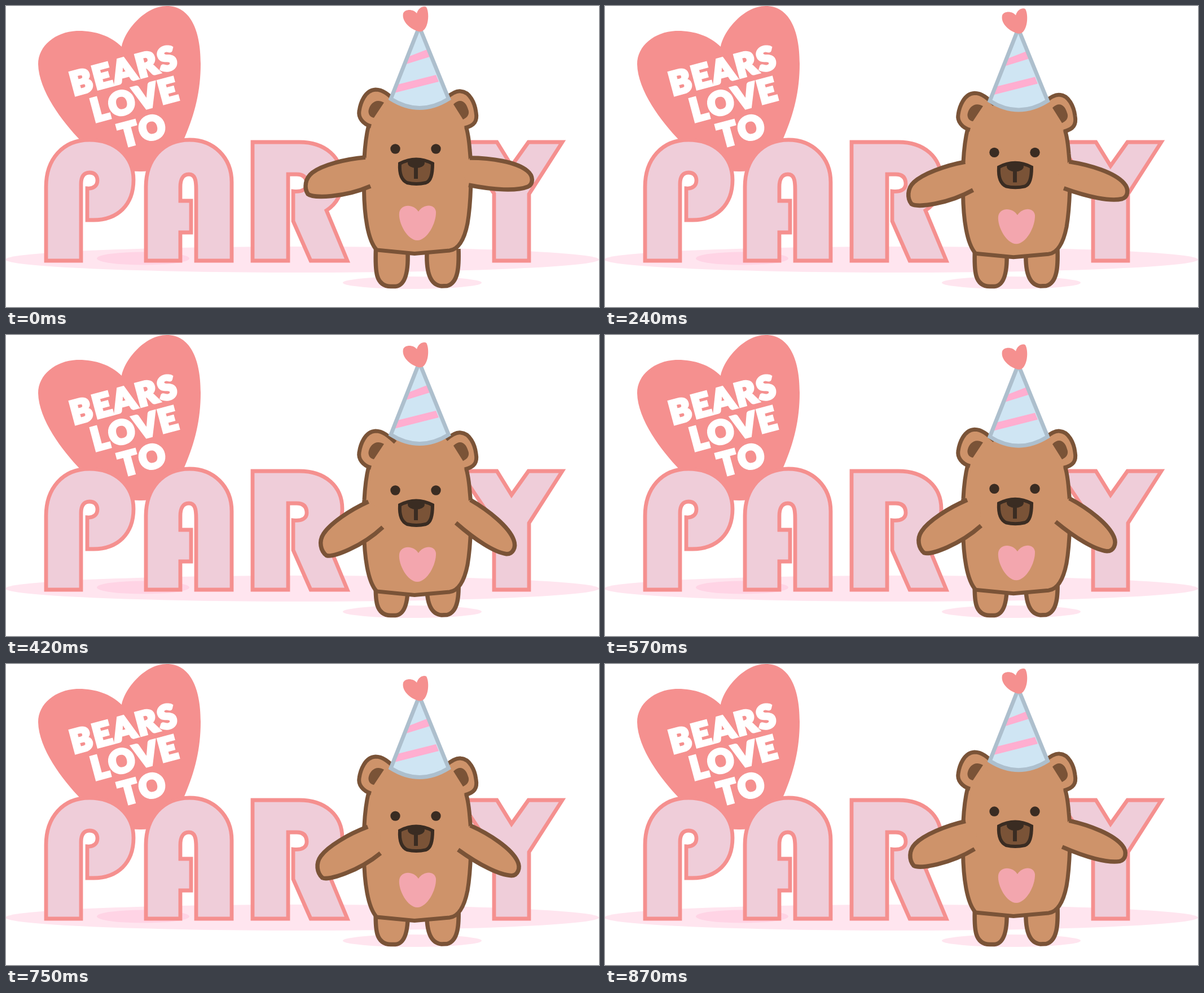
Animation of 1051x533 px, one loop 0.9 s. Source, as an HTML page with a canvas:

```html
<!DOCTYPE html>
<html lang="en">
<head>
<meta charset="utf-8">
<title>Bears love to party</title>
<style>
html, body { margin: 0; width: 100%; height: 100%; overflow: hidden; background: #fff; }
canvas { display: block; }
</style>
</head>
<body>
<canvas id="stage" width="1051" height="533"></canvas>
<script>
const ctx = document.getElementById('stage').getContext('2d');

const LOOP = 900, STEP = 30;
const CORAL = '#f5908f', ROSE = '#efcdd9', HAZE = '#ffe5ef';
const FUR = '#ce936a', BROWN = '#7a5337', DARK = '#3a2c22';

const P = d => new Path2D(d);

// An open outline whose fill is widened by an unstroked extra part.
const open = (d, extra) => ({ line: P(d), area: P(d + extra + 'Z') });

const bigHeart = P('M205 72C185 52 155 43 125 44C88 46 57 70 57 103C58 150 100 205 132 238C165 275 200 293 237 293C275 294 300 270 317 232C335 190 345 150 345 102C345 40 325 0 285 0C245 0 210 45 205 72Z');

const letters = [
  'M71 451V320C71 272 100 237 148 237C192 237 226 265 226 308C226 352 198 379 155 379H144V323C155 324 162 318 162 309C162 299 156 295 148 295C138 295 133 302 133 315V451Z',
  'M248 451V320C248 272 278 237 325 237C368 237 400 268 400 312V451H337V325C337 308 335 298 324 298C313 298 309 308 309 320V345H328V401H309V451Z',
  'M437 451V241H520C566 241 596 268 596 308C596 334 585 351 568 362L605 451H540L509 381V328C525 330 533 324 533 315C533 302 525 298 515 298H500V451Z',
  'M804 241H870L896 283L926 241H986L927 333V451H865V332Z'
].map(P);

const legs = [
  'M655.5 430C654 470 655 496 682 496.5H690C710 495 713 465 712 436',
  'M746 437C745 465 749 494 772 496L782 495.5C802 490 803 460 802 430'
].map(P);

const body = open(
  'M812 205C817 215 820 230 822 255C826 290 824 350 818 385C812 415 802 431 786 433L724 438.5L657 432C641 415 635 370 634.5 325C634 310 633 290 635 270C636 250 638 230 643 210',
  'L682 163C700 154 770 154 786 160'
);

const ears = [
  'M647 213C632 209 624 197 626 186C628 172 636 149 655 148C668 148 678 157 690 168',
  'M780 163C792 153 800 150 806 151C822 152 831 172 833 188C836 204 830 212 813 216'
].map(P);
const innerEars = [
  'M670 171L652 198C644 197 641 189 643 183C646 172 656 163 670 171Z',
  'M793 174L810 201C819 197 822 190 819 183C816 171 806 161 793 174Z'
].map(P);

const muzzle = P('M698 279Q727 264 756 279C756 298 753 310 744 313Q727 317 711 313C700 308 697 295 698 279Z');
const belly = P('M729 415C712 415 695 385 697 366C700 350 722 350 731 364C740 350 760 350 762 364C763 385 746 415 729 415Z');

const hat = P('M730 43L682 164.5Q733 196.5 784.5 164.5L735 43Z');
const stripes = P('M715 89L746 77L751 90L709 103ZM694 139L762 122L767 134L688 154Z');
const hatHeart = P('M728 44C714 39 701 26 704 13C707 5 722 5 728 13C731 2 741 -1 745 2C751 12 749 40 737 45Q732 46 728 44Z');

const arms = [
  {
    ...open('M637 268C600 271 560 282 543 295C530 305 528 322 535 333C545 341 600 339 646 319', 'L655 288'),
    x: 654.5, y: 255, turn: -19.5
  },
  {
    ...open('M822 269C860 269 905 276 924 292C935 301 935 315 925 320C905 328 865 326 820 317', 'L806 293'),
    x: 820.5, y: 271.5, turn: 30
  }
];

const lines = [['BEARS', 120, 159], ['LOVE', 157, 206], ['TO', 206, 251]];

function fill(path, color) {
  ctx.fillStyle = color;
  ctx.fill(path);
}

function stroke(path, color, width) {
  ctx.strokeStyle = color;
  ctx.lineWidth = width;
  ctx.stroke(path);
}

function shape(path, color, line, width) {
  fill(path, color);
  stroke(path, line, width);
}

function oval(x, y, rx, ry, color) {
  ctx.beginPath();
  ctx.ellipse(x, y, rx, ry, 0, 0, Math.PI * 2);
  ctx.fillStyle = color;
  ctx.fill();
}

function shifted(dy, draw) {
  ctx.save();
  ctx.translate(0, dy);
  draw();
  ctx.restore();
}

function bezier(x1, y1, x2, y2) {
  const at = (a, b, s) => 3 * (1 - s) * (1 - s) * s * a + 3 * (1 - s) * s * s * b + s * s * s;
  return x => {
    let lo = 0, hi = 1;
    for (let i = 0; i < 24; i++) {
      const mid = (lo + hi) / 2;
      if (at(x1, x2, mid) < x) lo = mid; else hi = mid;
    }
    return at(y1, y2, lo);
  };
}

const sink = bezier(.2, .35, 1, .09);
const rise = bezier(.2, .25, .93, -.03);
const lift = bezier(.3, .15, .93, -.06);

// Goes from 0 to 1, then back to 0 from the given time on.
function swing(t, back, ease) {
  if (t < 420) return sink(t / 420);
  return 1 - ease(Math.max(0, (t - back) / (LOOP - back)));
}

function hatDrop(t) {
  if (t < 420) return 12 * sink(t / 420);
  if (t < 750) return 12 + 8 * (t - 420) / 330;
  return 20 * (1 - ((t - 750) / 150) ** 2);
}

function drawSign() {
  oval(525, 449, 526, 23, HAZE);
  oval(243, 447, 82, 11.5, '#ffd4e5');
  fill(bigHeart, CORAL);

  ctx.font = '900 57px Lato, sans-serif';
  ctx.letterSpacing = '3px';
  ctx.fillStyle = ctx.strokeStyle = '#fff';
  ctx.lineWidth = 4.5;
  for (const [text, x, y] of lines) {
    ctx.save();
    ctx.translate(x, y);
    ctx.rotate(-15 * Math.PI / 180);
    ctx.fillText(text, 0, 0);
    ctx.strokeText(text, 0, 0);
    ctx.restore();
  }
  for (const l of letters) shape(l, ROSE, CORAL, 6.8);
}

function drawFace() {
  oval(690, 253, 8.7, 8.7, DARK);
  oval(762, 253, 8.7, 8.7, DARK);
  shape(muzzle, BROWN, DARK, 6);
  oval(727, 278, 15, 9, DARK);
  ctx.fillRect(723, 282, 7, 24);
}

function drawArm(arm, k) {
  ctx.save();
  ctx.translate(arm.x, arm.y);
  ctx.rotate(arm.turn * k * Math.PI / 180);
  ctx.translate(-arm.x, -arm.y);
  fill(arm.area, FUR);
  stroke(arm.line, BROWN, 7.5);
  ctx.restore();
}

function drawHat() {
  fill(hat, '#cfe5f3');
  fill(stripes, '#ffaed0');
  stroke(hat, '#adbfcd', 7);
  fill(hatHeart, CORAL);
}

function draw(t) {
  const crouch = swing(t, 450, rise);
  const droop = swing(t, 480, lift);
  ctx.fillStyle = '#fff';
  ctx.fillRect(0, 0, 1051, 533);
  drawSign();
  oval(720, 490, 123, 11, HAZE);
  for (const l of legs) shape(l, FUR, BROWN, 7.5);
  shifted(22 * crouch, () => {
    fill(body.area, FUR);
    stroke(body.line, BROWN, 7);
    for (const e of ears) shape(e, FUR, BROWN, 7);
    for (const e of innerEars) fill(e, BROWN);
    drawFace();
    fill(belly, '#f3a6ae');
    for (const a of arms) drawArm(a, droop);
  });
  shifted(hatDrop(t), drawHat);
}

const start = performance.now();
function tick() {
  const t = (performance.now() - start) % LOOP;
  draw(Math.floor(t / STEP) * STEP);
  requestAnimationFrame(tick);
}
tick();
</script>
</body>
</html>
```
